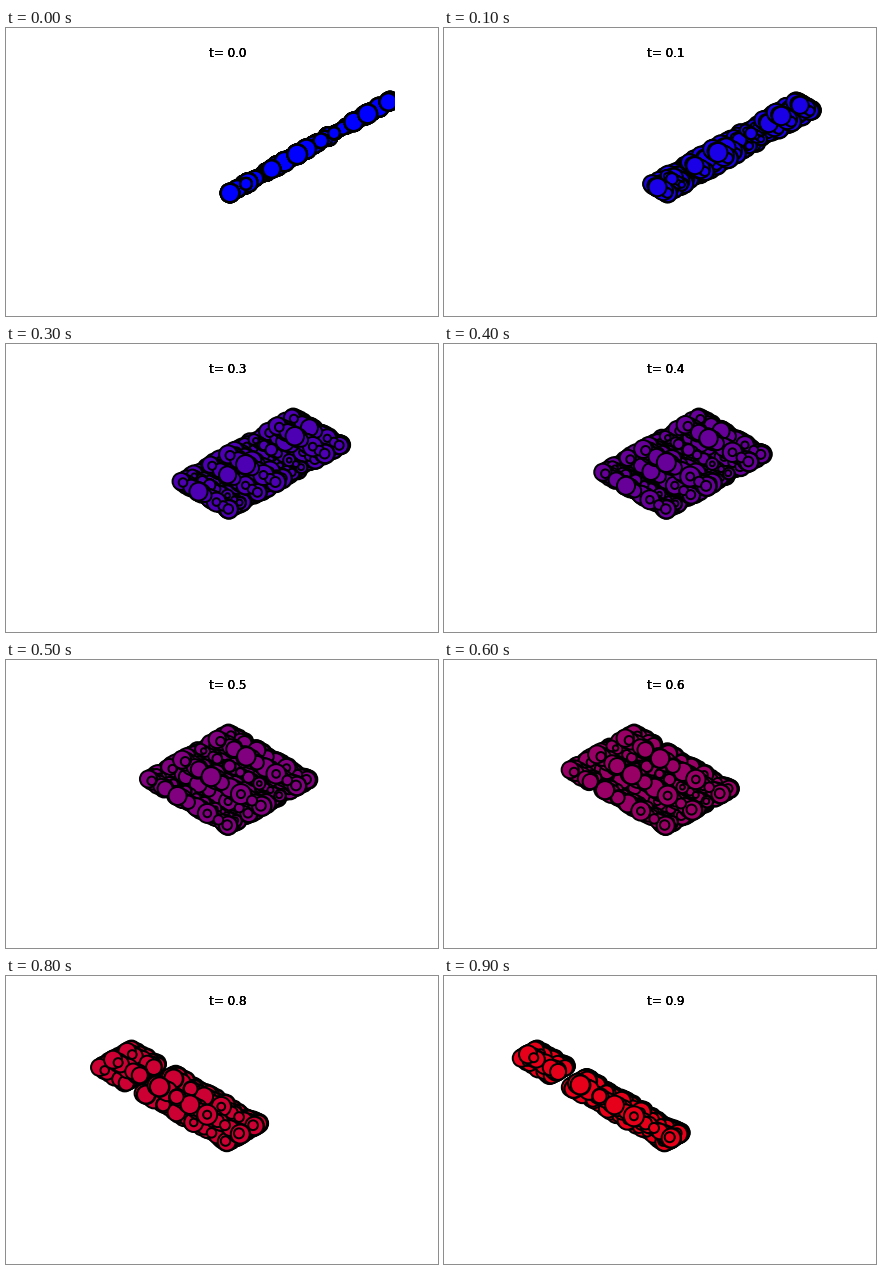
A matplotlib script that plays this animation: 432x288 px, repeating every 1 s.

```python
import numpy as np
import matplotlib.pyplot as plt
from matplotlib.animation import FuncAnimation

WIDTH, HEIGHT, DPI = 432, 288, 72
FRAMES, INTERVAL = 10, 100
MAX_RADIUS = 10
FIRST_AXIS = np.array([160, -92])
SECOND_AXIS = np.array([-159, -93])
GAP_START, GAP_SIZE = 0.66, 0.13

rng = np.random.default_rng(7)


def spread(count, end=1.0):
    """Shuffled places along a segment with random relative radii."""
    places = rng.permutation(np.linspace(0, end, count))
    return np.column_stack([places, np.sqrt(rng.uniform(0.35, 1, count))])


# Rows are (place, relative radius); the key points come last, so they lie on top.
first = np.vstack([spread(45), [
    (0.26, 0.9), (0.1, 0.6), (0.65, 0.6), (0.99, 0.9), (0, 0.95), (0.86, 0.97), (0.42, 1)]])

second = spread(45, 1 - GAP_SIZE)
second[second[:, 0] > GAP_START, 0] += GAP_SIZE
second = np.vstack([second, [
    (0, 0.95), (1, 0.9), (0.26, 1), (0.79, 0.8), (0.5, 0.7), (0.12, 0.5),
    (0.96, 0.45), (0.26, 0.4), (0.01, 0.5), (0.635, 0.95)]])

# Every point of the first segment is paired with every point of the second.
a, b = (grid.ravel() for grid in np.meshgrid(first[:, 0], second[:, 0], indexing="ij"))
radii = MAX_RADIUS * np.outer(first[:, 1], second[:, 1]).ravel()

fig = plt.figure(figsize=(WIDTH / DPI, HEIGHT / DPI), dpi=DPI, facecolor="white")
ax = fig.add_axes([0.125, 0.11, 0.775, 0.77])
ax.set_xlim(0.125 * WIDTH, 0.9 * WIDTH)
ax.set_ylim(0.89 * HEIGHT, 0.12 * HEIGHT)
ax.axis("off")

dots = ax.scatter(a, b, s=(2 * radii) ** 2, edgecolors="black", linewidths=2)
# Stacked layers give the label its heavy strokes.
labels = [ax.text(221.4, 28.56, "", ha="center", va="baseline", fontsize=12,
                  family="DejaVu Sans") for _ in range(4)]


def update(frame):
    t = frame / FRAMES
    origin = np.array([224 - 4 * t, 165 + t])
    dots.set_offsets(origin + np.outer(a * (1 - t), FIRST_AXIS) + np.outer(b * t, SECOND_AXIS))
    dots.set_facecolor([(t, 0, 1 - t)])
    for label in labels:
        label.set_text(f"t= {t:.1f}")
    return [dots, *labels]


anim = FuncAnimation(fig, update, frames=FRAMES, interval=INTERVAL, repeat=True, repeat_delay=0)
plt.show()
```
